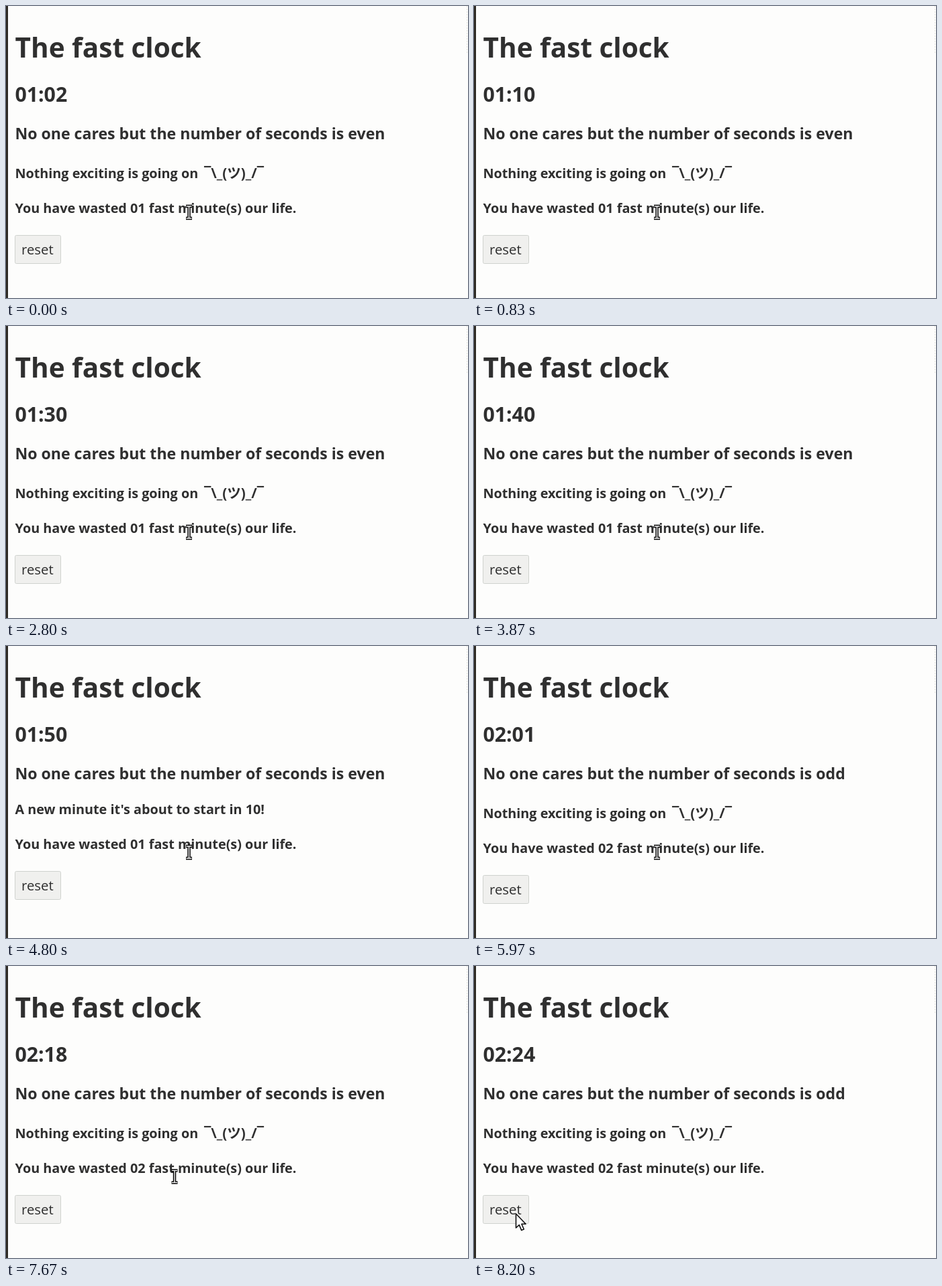
Write an HTML page that moves like this. It is 688 px wide and 436 px high and loops after 8.27 s.

```html
<!DOCTYPE html>
<html lang="en">
<head>
<meta charset="utf-8">
<title>The fast clock</title>
<style>
  html, body { margin: 0; width: 100%; height: 100%; overflow: hidden; background: #fdfdfc; }
  svg { display: block; }
  text { fill: #2f2f2f; font-family: Ubuntu, "Open Sans", "Noto Sans CJK JP", "Noto Sans CJK", sans-serif; font-weight: 700; white-space: pre; }
  .h1 { font-size: 40.5px; }
  .h2 { font-size: 30.3px; }
  .h3 { font-size: 23.1px; }
  .h4 { font-size: 19.8px; }
  .shrug { font-size: 20.6px; }
  .label { font-size: 20.4px; font-weight: 400; }
</style>
</head>
<body>
<svg width="688" height="436" viewBox="0 0 688 436">
  <rect width="688" height="436" fill="#fdfdfc"/>
  <rect width="3" height="436" fill="#2e2a24"/>
  <path d="M686.5 0V70" stroke="#e4e4de" stroke-dasharray="2 2"/>

  <text class="h1" x="13.6" y="77">The fast clock</text>
  <text class="h2" id="clock" x="13.4" y="143"></text>
  <text class="h3" id="parity" x="13.4" y="199"></text>
  <text class="h4" id="news" x="13.4" y="257"></text>
  <text class="shrug" id="shrug" x="295" y="257">¯\_(ツ)_/¯</text>
  <g id="lower">
    <text class="h4" id="wasted" x="13.6" y="309"></text>
    <rect x="13.5" y="342.5" width="68" height="42" rx="2" fill="#f0f0ee" stroke="#cfd2ce"/>
    <text class="label" x="23" y="371">reset</text>
  </g>

  <g id="beam" fill="none" stroke-linejoin="round">
    <path d="M-4.5 -9H4.5M0 -9V9M-4.5 9H4.5" stroke="#000" stroke-width="4.4"/>
    <path d="M-4 -9H4M0 -9V9M-4 9H4" stroke="#fff" stroke-width="1.4"/>
  </g>
  <path id="arrow" d="M0 0V21L4.8 16.6L8.2 24.6L11.8 23L8.4 15.2H14.6Z"
        fill="#fff" stroke="#111" stroke-width="1.6" stroke-linejoin="round"/>
</svg>
<script>
  const LOOP = 8270, TICK = 99.85, PHASE = 0.995;
  const PRESS = 8180; // the parity line stops updating here
  const el = id => document.getElementById(id);
  const pad = n => String(n).padStart(2, "0");
  const mix = (a, b, k) => a + (b - a) * k;
  const seconds = t => 61 + Math.floor(t / TICK + PHASE);

  function setText(id, value) {
    const node = el(id);
    if (node.textContent !== value) node.textContent = value;
  }

  function show(id, visible) {
    el(id).style.visibility = visible ? "visible" : "hidden";
  }

  function place(id, x, y, visible) {
    el(id).setAttribute("transform", `translate(${x} ${y})`);
    show(id, visible);
  }

  function drawClock(t) {
    const total = seconds(t);
    const min = Math.floor(total / 60), sec = total % 60;
    const odd = seconds(Math.min(t, PRESS)) % 2;
    const ending = sec >= 50;

    setText("clock", pad(min) + ":" + pad(sec));
    setText("parity", "No one cares but the number of seconds is " + (odd ? "odd" : "even"));
    setText("news", ending
      ? `A new minute it's about to start in ${60 - sec}!`
      : "Nothing exciting is going on ");
    setText("wasted", `You have wasted ${pad(min)} fast minute(s) our life.`);

    // the plain message line is shorter than the one with the tall glyph
    show("shrug", !ending);
    el("news").setAttribute("y", ending ? 251 : 257);
    el("lower").setAttribute("transform", `translate(0 ${ending ? -6 : 0})`);
  }

  function drawPointer(t) {
    const k = Math.min(1, Math.max(0, (t - 7560) / 560));
    const e = k * k * (3 - 2 * k);
    const x = mix(272.5, 62.5, e), y = mix(308, 370, e);
    const overText = y < 316;
    place("beam", x, y, overText);
    place("arrow", x, y, !overText);
  }

  const start = performance.now();
  function frame() {
    const t = (performance.now() - start) % LOOP;
    drawClock(t);
    drawPointer(t);
    requestAnimationFrame(frame);
  }
  frame();
</script>
</body>
</html>
```
